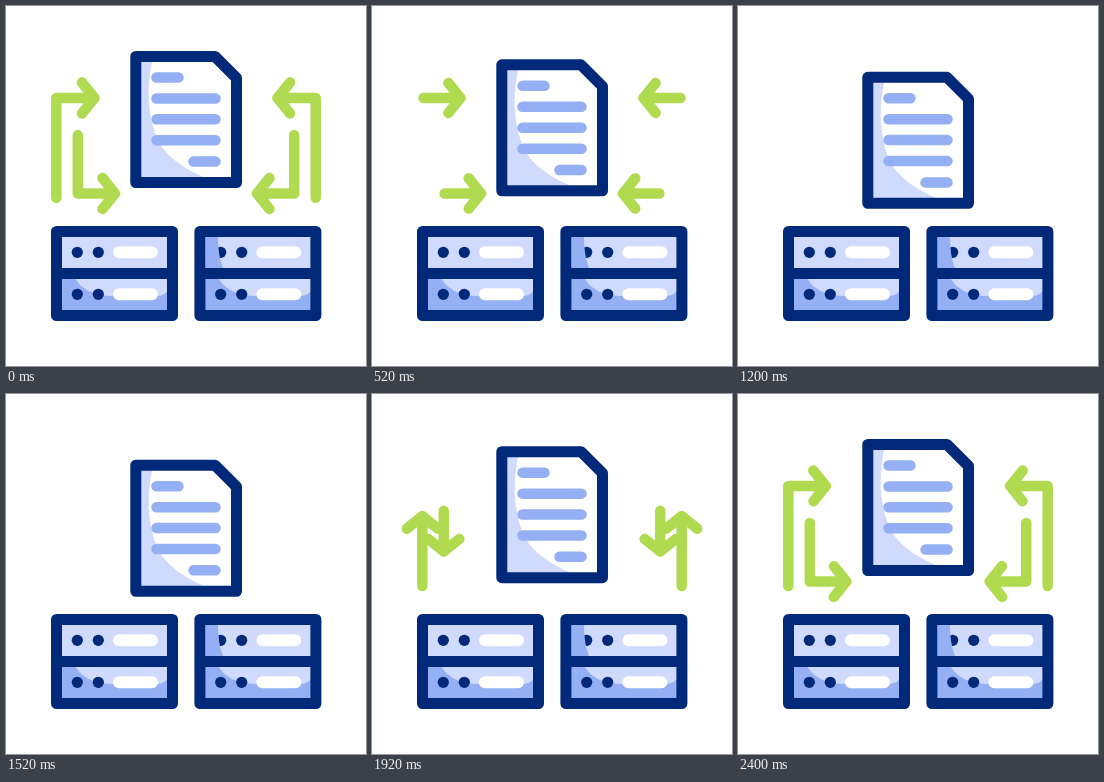
An HTML page that plays this animation: 360 px wide and 360 px high, repeating every 2.42 s.

```html
<!DOCTYPE html>
<html lang="en">
<head>
<meta charset="utf-8">
<title>Data exchange</title>
<style>
  html, body { margin: 0; height: 100%; overflow: hidden; background: #fff; }
  svg { display: block; width: 100%; height: 100%; }
  .ink { fill: none; stroke: #00297a; stroke-width: 11; }
  .dots { fill: #00297a; }
  .mid { fill: #94aff3; }
  .light { fill: #cfdafc; }
  .text { fill: none; stroke: #94aff3; stroke-width: 10.5; }
  .pills { stroke: #fff; stroke-width: 12; }
  .arrow { fill: none; stroke: #b0da50; stroke-width: 10.5; }
</style>
</head>
<body>
<svg viewBox="0 0 360 360" stroke-linecap="round" stroke-linejoin="round">
  <defs>
    <g id="server">
      <path class="light" d="M51 226H166V309H51z"/>
      <path class="mid" d="M51 268H67Q76 290 108 290H150Q160 290 166 280V309H51z"/>
      <path class="ink" d="M50.5 225.5H166.5V309.5H50.5zM50.5 267.5H166.5"/>
      <g class="dots">
        <circle cx="71.3" cy="246.3" r="5.6"/><circle cx="92.3" cy="246.3" r="5.6"/>
        <circle cx="71.3" cy="288.3" r="5.6"/><circle cx="92.3" cy="288.3" r="5.6"/>
      </g>
      <path class="pills" d="M113 246.3H146M113 288.3H146"/>
    </g>
    <g id="arrows">
      <path class="arrow"/>
      <path class="arrow"/>
    </g>
  </defs>

  <use href="#server"/>
  <use href="#server" x="143.4"/>
  <path class="mid" d="M200 231H212Q212 250 217 262H200z"/>

  <g id="page">
    <path class="light" d="M130 51H147Q137 95 150 130Q160 158 212 177H130z"/>
    <path class="text" d="M150.5 71.5H172.5M150.5 92.5H209.5M150.5 113.3H209.5M150.5 134.3H209.5M187.5 155.6H209.5"/>
    <path class="ink" d="M129.8 50.5H209L230.5 72V176.5H129.8z"/>
  </g>

  <use href="#arrows"/>
  <use href="#arrows" transform="matrix(-1 0 0 1 360 0)"/>
</svg>
<script>
const LOOP = 2420, BEND = 510, ENTER = 1530, TURN = 2090;
const page = document.getElementById('page');
const paths = document.querySelectorAll('.arrow');

// dir: -1 runs up, 1 runs down, before turning sideways towards the page
const arrows = [
  { x: 50.3, start: 192, tail: 192, bend: 92, tip: 88.5, dir: -1, gone: 860 },
  { x: 71.8, start: 88, tail: 129, bend: 187.5, tip: 109, dir: 1, gone: 1000 }
];

const lerp = (a, b, k) => a + (b - a) * k;
const clamp = k => Math.max(0, Math.min(1, k));

function head(x, y, angle, size, innerSide = 1, innerSize = 1) {
  const c = Math.cos(angle) * size, s = Math.sin(angle) * size;
  const wing = side => {
    const k = side === innerSide ? innerSize : 1;
    const dx = -12.5 * k, dy = 15.5 * side * k;
    return `${x + dx * c - dy * s} ${y + dx * s + dy * c}`;
  };
  return `M${wing(-1)}L${x} ${y}L${wing(1)}`;
}

function arrowPath({ x, start, tail, bend, tip, dir, gone }, t) {
  if (t < BEND) {
    return `M${x} ${lerp(tail, bend, t / BEND)}V${bend}H${tip}` + head(tip, bend, 0, 1);
  }
  if (t < gone) {
    const size = (gone - t) / (gone - BEND);
    return `M${lerp(tip, x, size)} ${bend}H${tip}` + head(tip, bend, 0, size);
  }
  if (t < ENTER) return '';
  const upright = dir * Math.PI / 2;
  if (t < TURN) {
    const k = (t - ENTER) / (TURN - ENTER), y = lerp(start, bend, k);
    return `M${x} ${lerp(start, tail, k)}V${y}` + head(x, y, upright, clamp(k * 8));
  }
  const k = 1 - (1 - (t - TURN) / (LOOP - TURN)) ** 1.4;
  const px = lerp(x, tip, k);
  return `M${x} ${tail}V${bend}H${px}` +
    head(px, bend, upright * (1 - clamp(k * 2.5)), 1, -dir, 1 - 0.3 * Math.sin(Math.PI * k));
}

function pageDrop(t) {
  const edge = t < LOOP / 2 ? t / 880 : (2400 - t) / 880;
  return 20.8 * (1 - Math.cos(clamp(edge) * Math.PI / 2));
}

function draw() {
  const t = performance.now() % LOOP;
  page.setAttribute('transform', `translate(0 ${pageDrop(t)})`);
  arrows.forEach((a, i) => paths[i].setAttribute('d', arrowPath(a, t)));
  requestAnimationFrame(draw);
}
draw();
</script>
</body>
</html>
```
